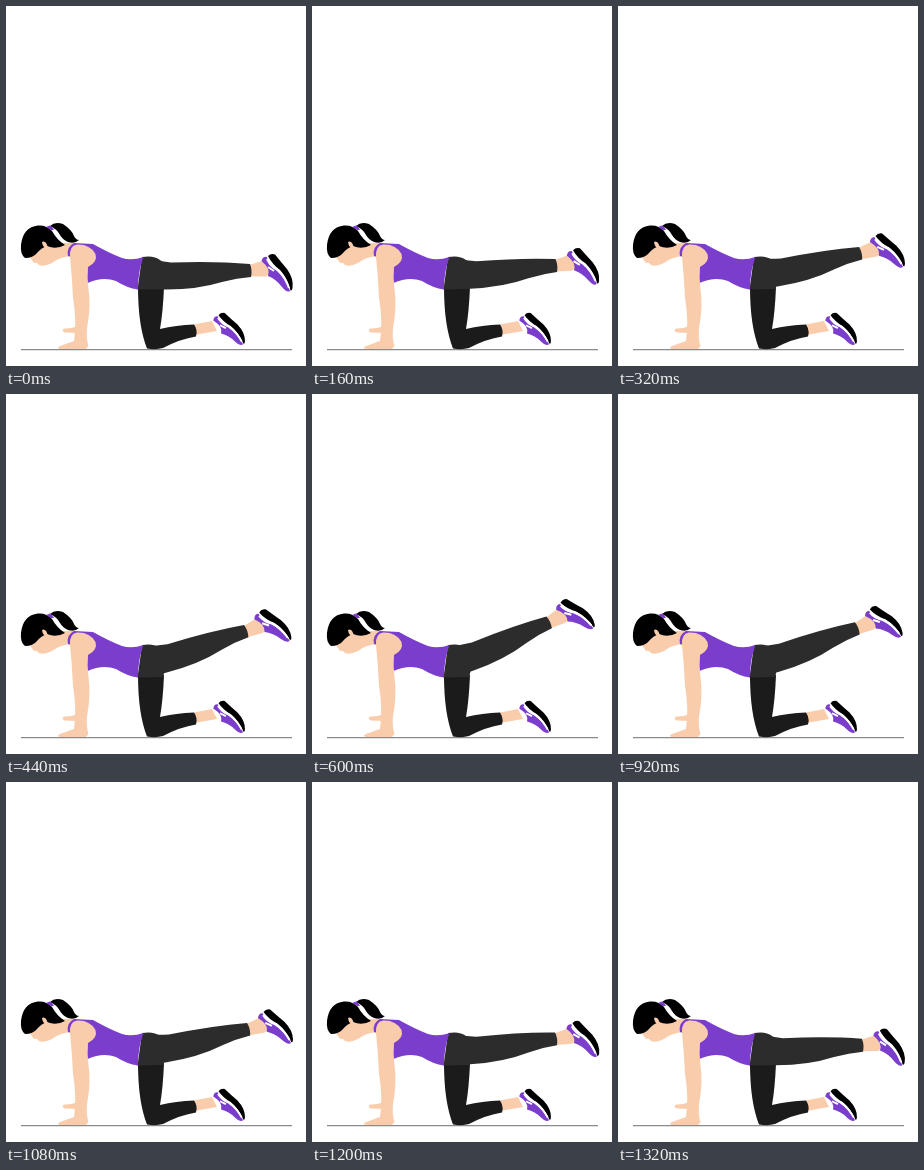
Recreate the animation shown at these times as an HTML page. Size 300 px wide and 360 px high, loop 1.36 s.

```html
<!DOCTYPE html>
<html>
<head>
<meta charset="utf-8">
<style>
  html, body { margin: 0; width: 100%; height: 100%; overflow: hidden; background: #fff; }
  svg { display: block; width: 300px; height: 360px; }
  .skin { fill: #f9cdab; }
  .top { fill: #7b3dcc; }
  .near { fill: #2c2c2c; }
  .far { fill: #1b1b1b; }
</style>
</head>
<body>
<svg viewBox="0 0 300 360">
  <defs>
    <g id="shoe">
      <path fill="#fff" d="M259 252L265 250Q277 261 285 283L283 286Q268 277 259 252Z"/>
      <path class="top" d="M255.500 255Q257 250 261 251Q262 260 270 264Q280 273 284 285Q281 287 276 281Q270 273 262 270Q265 263 255.500 255Z"/>
      <path d="M262 250Q265 247 269 248.500Q275 256 281 263Q288 273 286.500 282Q286 285 284.500 284.500Q282 273 274 264Q266 258 262 250Z"/>
      <path fill="none" stroke="#fff" stroke-width="2" d="M261 253Q264 260 272 264Q279 271 283 282M262 261L268 265"/>
    </g>
  </defs>

  <path stroke="#8a8a8a" stroke-width="1.300" d="M15 343.700H286"/>

  <!-- supporting leg -->
  <path class="skin" d="M188 318.500L206 315L211 325L188 329Z"/>
  <use href="#shoe" transform="translate(215 307) rotate(-8) scale(.92) translate(-265 -248)"/>
  <path class="far" d="M132 281H158Q157 306 154 323Q170 319 188 318.500Q192 324 190 330.500Q174 333 157 342Q150 344 141 342.500Q132 320 132 281Z"/>

  <!-- raised leg -->
  <g id="leg">
    <path class="skin" d="M243 259L258 254.500Q261 263 265 267L260 270.500L243 270.500Z"/>
    <use href="#shoe"/>
    <path class="near" d="M140 252Q152 255 165 256.500Q210 255 244 258Q246.500 264 245 271Q231 272 216 276Q190 284 157 283.500L140 283Z"/>
  </g>
  <path class="near" d="M136 251Q148 249 154 254Q163 259 160 272L157 283L131.500 283.500Z"/>

  <!-- far hand, neck and face -->
  <path class="skin" d="M72 320Q64 323 58 322.500Q55 325 59 326.500L73 327Z"/>
  <path class="skin" d="M23 250L28 257Q31 256 33 259Q38 261 46 257Q53 251 66 250L72 237H56L38 234Z"/>

  <!-- torso -->
  <path class="top" d="M62 250Q60 241 68 237L87 238Q103 247 116 252Q126 255 137.500 251Q132 265 132 283.500Q121 282 110 275Q97 270 81.500 277L78 255Z"/>

  <!-- near arm -->
  <path class="skin" d="M64 251Q63 240 71 238.500Q84 238 89.500 248Q92 256 82 261Q81 272 82.500 283Q85 302 81 322Q80 333 82.500 340L80 343H54Q50 342 54 340L68 335Q71 315 67 292Q66 270 64 251Z"/>

  <!-- hair -->
  <path d="M19 252Q14 248 15 239Q17 221 32 219.500Q41 219 46 225Q51 234 59 239Q50 244 41 240Q35 242 31 247Q27 252 19 252Z"/>
  <path class="skin" d="M36 236Q40 234 42 242Q37 243 36 236Z"/>
  <path d="M44 220Q49 215 57 218Q66 224 68 230Q70 234 73 234Q69 238 62 236Q57 234 54 229Q51 223 44 220Z"/>
  <path class="top" d="M40 221L44 219.500Q47 221 48 224L45 224Z"/>
</svg>
<script>
  const FRAME = 40, LOOP = 1360, RISE = 680, LIFT = 21;
  const leg = document.getElementById('leg');

  function draw(now) {
    const t = Math.floor(now % LOOP / FRAME) * FRAME;
    const progress = (t <= RISE ? t : LOOP + FRAME - t) / RISE;
    const angle = LIFT * (1 - Math.cos(Math.PI * progress)) / 2;
    leg.setAttribute('transform', `rotate(${-angle} 140 267)`);
  }

  const start = performance.now();
  function tick() {
    draw(performance.now() - start);
    requestAnimationFrame(tick);
  }
  tick();
</script>
</body>
</html>
```
